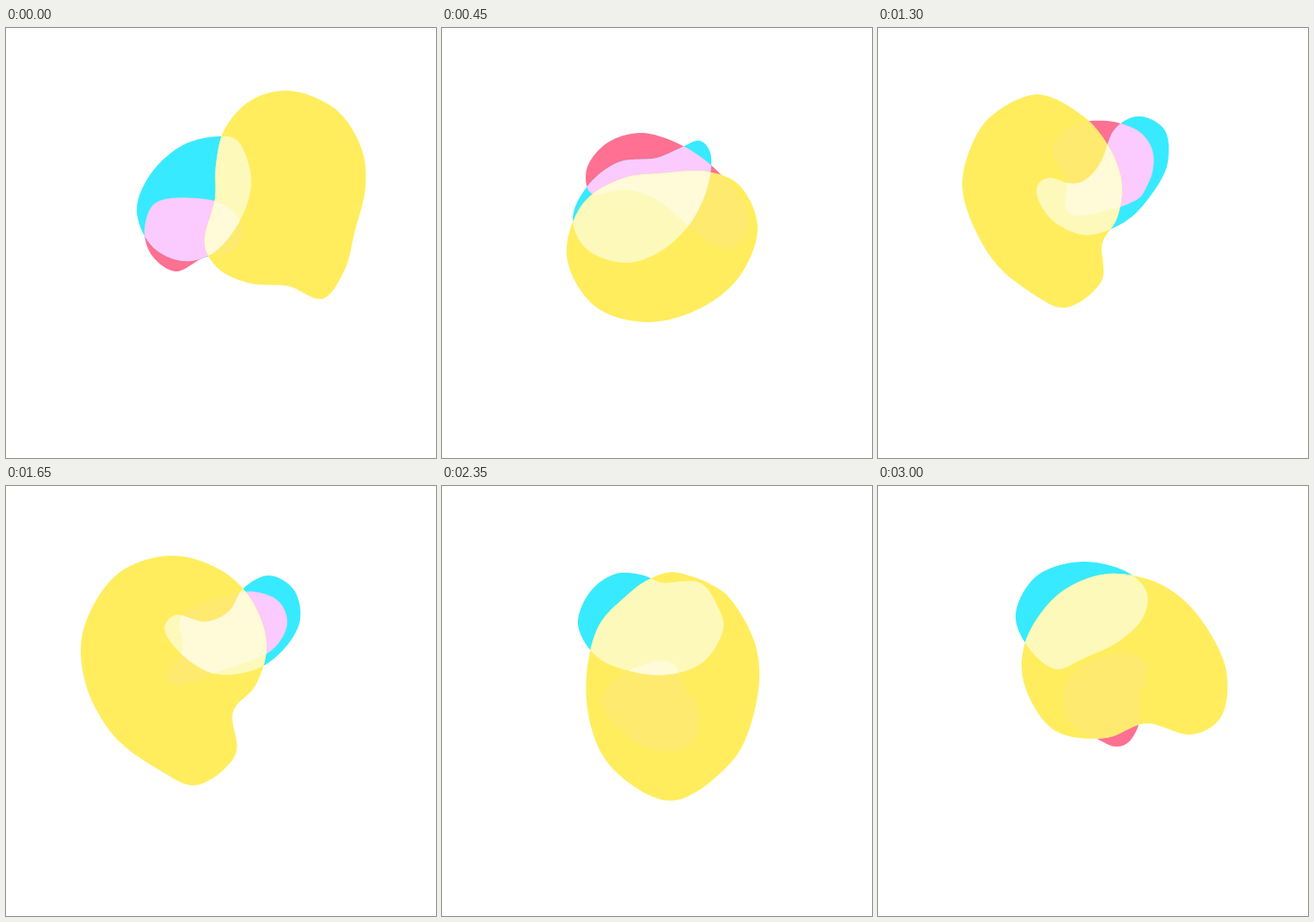
An HTML page with a canvas that plays this animation: 500 by 500 pixels, repeating every 3.05 s.

```html
<!DOCTYPE html>
<html lang="en">
<head>
<meta charset="utf-8">
<title>Blobs</title>
<style>
html, body { margin: 0; width: 100%; height: 100%; overflow: hidden; background: #fff; }
canvas { display: block; width: 100vmin; height: 100vmin; }
</style>
</head>
<body>
<canvas id="stage" width="500" height="500"></canvas>
<script>
const LOOP = 3050, STEP = 50, SAMPLES = 120;
const ctx = document.getElementById('stage').getContext('2d');
const mod = (i, n) => ((i % n) + n) % n;

// Non-uniform Hermite interpolation between b and c.
function spline(a, b, c, d, ta, tb, tc, td, t) {
  const h = tc - tb, u = (t - tb) / h, v = 1 - u;
  const slope = (c - b) / h;
  const left = (b - a) / (tb - ta), right = (d - c) / (td - tc);
  const mb = (left * h + slope * (tb - ta)) / (tc - ta);
  const mc = (slope * (td - tc) + right * h) / (td - tb);
  return v * v * (1 + 2 * u) * b + u * u * (3 - 2 * u) * c + h * u * v * (v * mb - u * mc);
}

// Closed smooth outline through a few points, resampled evenly by length.
function outline(flat) {
  const pts = [];
  for (let i = 0; i < flat.length; i += 2) pts.push([flat[i], flat[i + 1]]);
  const n = pts.length, at = i => pts[mod(i, n)];
  const gap = i => Math.sqrt(Math.hypot(at(i + 1)[0] - at(i)[0], at(i + 1)[1] - at(i)[1]));
  const fine = [];
  for (let i = 0; i < n; i++) {
    const ta = -gap(i - 1), tc = gap(i), td = tc + gap(i + 1);
    for (let k = 0; k < 24; k++) {
      fine.push([0, 1].map(q =>
        spline(at(i - 1)[q], at(i)[q], at(i + 1)[q], at(i + 2)[q], ta, 0, tc, td, tc * k / 24)));
    }
  }
  fine.push(fine[0]);
  const len = [0];
  for (let i = 1; i < fine.length; i++) {
    len.push(len[i - 1] + Math.hypot(fine[i][0] - fine[i - 1][0], fine[i][1] - fine[i - 1][1]));
  }
  const total = len[len.length - 1], out = [];
  for (let s = 0, j = 0; s < SAMPLES; s++) {
    const goal = total * s / SAMPLES;
    while (len[j + 1] < goal) j++;
    const f = (goal - len[j]) / (len[j + 1] - len[j]);
    out.push([0, 1].map(q => fine[j][q] + (fine[j + 1][q] - fine[j][q]) * f));
  }
  return out;
}

const yellow = [], cyan = [], pink = [];
const pose = (blob, t, ...flat) => blob.push({ t, pts: outline(flat) });

pose(yellow, 0, 330,73, 385,96, 414,142, 418,185, 406,235, 393,283, 368,315, 328,300,
  284,297, 247,280, 231,252, 243,198, 244,160, 254,118, 285,84);
pose(yellow, 450, 255,169, 308,167, 345,182, 367,232, 345,290, 298,327, 237,342,
  177,323, 145,265, 164,204, 210,175);
pose(yellow, 900, 207,116, 258,133, 291,178, 303,235, 286,290, 227,320, 172,294,
  138,242, 125,197, 148,139);
pose(yellow, 1650, 192,81, 250,98, 285,132, 303,185, 290,232, 264,262, 267,312,
  221,348, 178,330, 125,290, 92,228, 90,167, 130,102);
pose(yellow, 2050, 238,163, 265,147, 290,137, 325,152, 350,195, 362,255, 348,320,
  305,374, 241,395, 175,373, 125,308, 108,230, 125,175, 172,142, 205,150);
pose(yellow, 2200, 255,125, 320,135, 362,190, 373,255, 345,340, 262,391, 180,345,
  143,250, 157,180, 205,138);
pose(yellow, 2650, 279,82, 327,100, 352,150, 348,212, 316,270, 253,298, 196,271,
  179,222, 194,160, 211,112, 240,89);
pose(yellow, 3000, 280,102, 330,115, 370,148, 405,215, 398,270, 365,289, 311,276,
  265,293, 205,284, 170,230, 171,182, 205,130, 245,107);

pose(cyan, 0, 268,130, 285,175, 273,222, 240,262, 206,271, 170,254, 152,212,
  168,170, 206,136, 248,126);
pose(cyan, 450, 300,131, 312,145, 308,187, 285,232, 250,262, 213,273, 168,257,
  152,222, 169,184, 205,156, 250,151, 276,140);
pose(cyan, 900, 304,110, 329,128, 325,168, 301,212, 265,250, 220,268, 180,251,
  170,220, 182,197, 214,194, 240,170, 262,138, 280,118);
pose(cyan, 1650, 306,104, 335,121, 341,160, 303,207, 247,219, 207,198, 184,165,
  197,150, 232,158, 259,146, 276,119);
pose(cyan, 2050, 307,113, 332,126, 340,160, 310,206, 246,220, 190,206, 164,168,
  176,135, 212,116, 244,123, 264,133, 285,123);
pose(cyan, 2650, 290,107, 304,135, 314,162, 290,200, 232,216, 181,195, 158,152,
  180,108, 235,89);
pose(cyan, 3000, 293,102, 313,125, 308,153, 281,180, 240,200, 207,213, 175,188,
  160,150, 184,105, 238,88);

pose(pink, 0, 222,198, 258,208, 276,236, 264,258, 230,267, 197,283, 170,265,
  161,236, 173,204);
pose(pink, 450, 230,122, 278,136, 322,168, 355,215, 350,247, 325,256, 287,230,
  250,200, 215,188, 173,192, 168,165, 190,135);
pose(pink, 900, 208,118, 255,146, 292,182, 319,222, 317,240, 295,246, 250,228,
  212,197, 182,170, 180,138);
pose(pink, 1650, 255,128, 290,123, 318,135, 327,160, 310,190, 250,215, 196,232,
  188,222, 205,190, 203,152);
pose(pink, 2050, 192,215, 208,222, 206,250, 218,295, 210,338, 180,348, 145,335,
  124,290, 135,248, 160,226);
pose(pink, 2650, 322,177, 355,184, 381,215, 372,244, 345,252, 300,245, 262,230,
  255,208, 280,187);
pose(pink, 3000, 285,195, 311,206, 305,245, 303,278, 290,299, 276,303, 255,294,
  222,272, 217,235, 238,208);

function shapeAt(blob, t) {
  const n = blob.length;
  let i = n - 1;
  while (blob[i].t > t) i--;
  const keys = [-1, 0, 1, 2].map(k => {
    const key = blob[mod(i + k, n)];
    return { pts: key.pts, t: key.t + Math.floor((i + k) / n) * LOOP };
  });
  const [a, b, c, d] = keys;
  const path = new Path2D();
  for (let s = 0; s < SAMPLES; s++) {
    const [x, y] = [0, 1].map(q =>
      spline(a.pts[s][q], b.pts[s][q], c.pts[s][q], d.pts[s][q], a.t, b.t, c.t, d.t, t));
    path.lineTo(x, y);
  }
  path.closePath();
  return path;
}

function fill(color, shape, ...clips) {
  ctx.save();
  clips.forEach(c => ctx.clip(c));
  ctx.fillStyle = color;
  ctx.fill(shape);
  ctx.restore();
}

function draw() {
  const t = Math.floor(performance.now() % LOOP / STEP) * STEP;
  const y = shapeAt(yellow, t), c = shapeAt(cyan, t), p = shapeAt(pink, t);
  ctx.fillStyle = '#fff';
  ctx.fillRect(0, 0, 500, 500);
  fill('#ff7092', p);
  fill('#38eaff', c);
  fill('#fbcbff', p, c);
  fill('#ffed5e', y);
  fill('#ffea70', p, y);
  fill('#fdf9bb', c, y);
  fill('#fffad8', p, c, y);
  requestAnimationFrame(draw);
}
draw();
</script>
</body>
</html>
```
